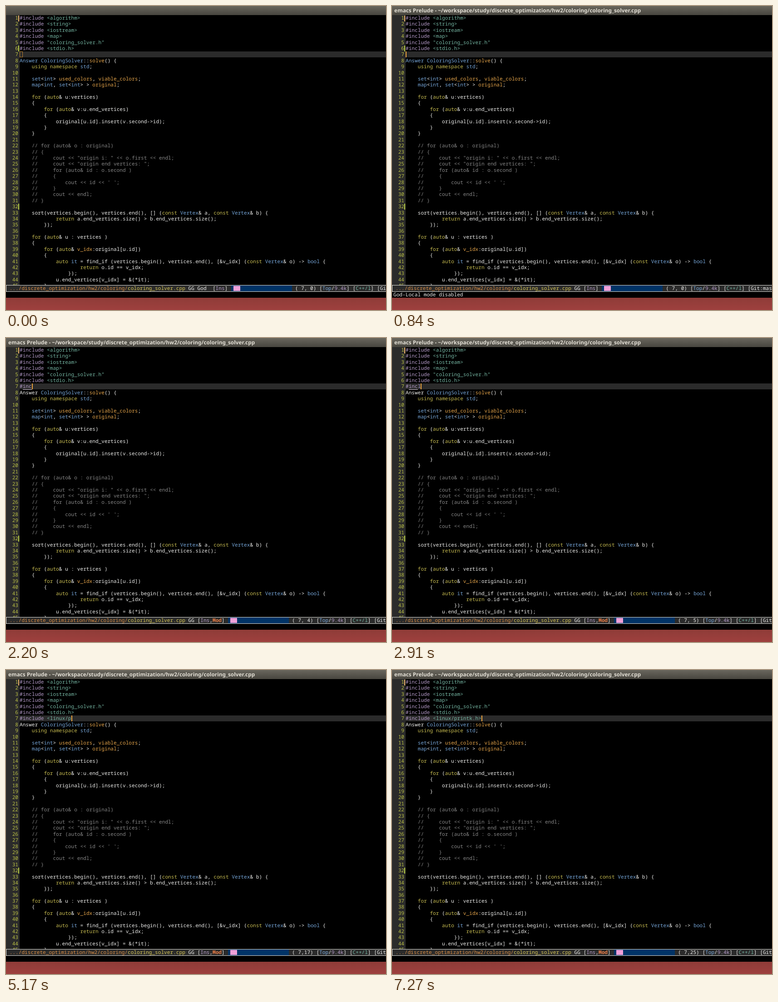
Animation of 837 by 669 pixels, one loop 8 s. Source, as an HTML page:

```html
<!DOCTYPE html>
<html lang="en">
<head>
<meta charset="utf-8">
<title>Editor</title>
<style>
  html, body { margin: 0; width: 100%; height: 100%; overflow: hidden; background: #000; }
  #stage { position: relative; width: 837px; height: 669px; overflow: hidden; background: #000; }
  #stage div { position: absolute; }
  #stage, pre {
    font: 11.14px/13.384px "Noto Sans Mono", "DejaVu Sans Mono", monospace;
    text-rendering: geometricPrecision; font-variant-ligatures: none; color: #eeeeec;
  }
  pre { position: absolute; margin: 0; white-space: pre; }
  #titlebar { left: 0; top: 0; width: 837px; height: 20px; background: linear-gradient(#69665d, #48463f); }
  #title { left: 5px; top: 1px; font: bold 11.85px/18px "Noto Sans", "Open Sans", sans-serif;
    white-space: pre; color: #e2ded4; }
  #editor { left: 0; top: 20px; width: 837px; height: 594px; overflow: hidden; }
  #gutter { left: 0; top: 0; width: 30px; height: 594px; background: #2b2b2b; }
  #numbers { right: 3px; top: 0; text-align: right; color: #b9bf45; }
  #current { left: 30px; top: 80px; width: 807px; height: 13px; background: #2b2b2b; }
  #code { left: 30px; top: 0; }
  .mark { left: 27px; width: 2px; height: 13px; background: #b9d045; }
  #cursor { top: 80px; height: 13px; box-sizing: border-box; background: #e8a03c; }
  #squiggle { top: 93px; height: 1px; background: #d8c8dc; }
  #modeline { left: 0; top: 614px; width: 850px; height: 13px; background: #2b2b2b; border: 1px solid #deded8; }
  #modeline pre { top: 0; line-height: 13px; }
  #bar { top: 0; width: 134px; height: 13px; background: #003366; }
  #bar div { left: 5px; top: 1px; width: 15px; height: 11px; background: #f0a0d8; }
  #message { left: 3px; top: 629px; }
  #desktop { left: 0; top: 642px; width: 837px; height: 27px; background: linear-gradient(#8f3c38, #9e403e); }
  .comment { color: #858585; }
  .directive { color: #b49ac8; }
  .string { color: #74b5a2; }
  .keyword { color: #c6bb50; }
  .type { color: #75a5d8; }
  .name { color: #e6a54a; }
  .path { color: #d68a42; }
  .file { color: #d5c554; }
  .modified { color: #e87b45; font-weight: bold; }
</style>
</head>
<body>
<div id="stage">
  <div id="titlebar"><div id="title">emacs Prelude - ~/workspace/study/discrete_optimization/hw2/coloring/coloring_solver.cpp</div></div>
  <div id="editor">
    <div id="gutter"><pre id="numbers"></pre></div>
    <div id="current"></div>
    <div class="mark" style="top:1px;background:#f0b56c"></div>
    <div class="mark" id="mark6" style="top:67px"></div>
    <div class="mark" style="top:415px"></div>
    <pre id="code"></pre>
    <div id="squiggle"></div>
    <div id="cursor"></div>
  </div>
  <div id="modeline"><pre id="modeLeft"></pre><div id="bar"><div></div></div><pre id="modeRight"></pre></div>
  <pre id="message">God-Local mode disabled</pre>
  <div id="desktop"></div>
</div>
<script>
const LOOP = 8000, CELL = 6.685;
const $ = id => document.getElementById(id);

// Shorthand in the listing: % opens a comment, @ is the name of the map.
const listing = `#include <algorithm>
#include <string>
#include <iostream>
#include <map>
#include "coloring_solver.h"
#include <stdio.h>

Answer ColoringSolver::solve() {
    using namespace std;

    set<int> used_colors, viable_colors;
    map<int, set<int> > @;

    for (auto& u:vertices)
    {
        for (auto& v:u.end_vertices)
        {
            @[u.id].insert(v.second->id);
        }
    }

    % for (auto& o : @)
    % {
    %     cout << "origin i: " << o.first << endl;
    %     cout << "origin end vertices: ";
    %     for (auto& id : o.second )
    %     {
    %         cout << id << ' ';
    %     }
    %     cout << endl;
    % }

    sort(vertices.begin(), vertices.end(), [] (const Vertex& a, const Vertex& b) {
            return a.end_vertices.size() > b.end_vertices.size();
        });

    for (auto& u : vertices )
    {
        for (auto& v_idx:@[u.id])
        {
            auto it = find_if (vertices.begin(), vertices.end(), [&v_idx] (const Vertex& o) -> bool {
                    return o.id == v_idx;
                });
            u.end_vertices[v_idx] = &(*it);
        }`.replaceAll("%", "/".repeat(2)).replaceAll("@", "original").split("\n");

const rules = new RegExp([
  /(?<comment>[/]{2}.*)/,
  /(?<directive>^#\w+)/,
  /(?<string>(?<=^#\w+ )[<"].*)/,
  /(?<keyword>\b(?:using|namespace|for|auto|const|return)\b)/,
  /(?<type>\b(?:Answer|ColoringSolver|std|set|map|int|Vertex|bool|it(?= =))\b)/,
  /(?<name>\b(?:solve|used_colors|viable_colors|v_idx(?=:)|(?<=> > )\w+)\b)/
].map(rule => String(rule).slice(1, -1)).join("|"), "g");

const escape = s => s.replace(/&/g, "&amp;").replace(/</g, "&lt;");
const span = (kind, s) => `<span class="${kind}">${escape(s)}</span>`;

function highlight(line) {
  let html = "", end = 0;
  for (const match of line.matchAll(rules)) {
    const kind = Object.keys(match.groups).find(k => match.groups[k] !== undefined);
    html += escape(line.slice(end, match.index)) + span(kind, match[0]);
    end = match.index + match[0].length;
  }
  return html + escape(line.slice(end));
}

const lines = listing.map(highlight);
$("numbers").textContent = lines.map((_, i) => i + 1).join("\n");
$("code").innerHTML = lines.map(html => `<span>${html}\n</span>`).join("");
const [typedLine, answerLine] = [6, 7].map(i => $("code").children[i]);

// Keystrokes: the text on the edited line from each time on.
const typing = [
  [0, ""], [1430, "#"], [1670, "#i"], [1730, "#in"], [1970, "#inc"], [2350, "#incu"],
  [2680, "#inc"], [2910, "#incl"], [2970, "#inclu"], [3030, "#includ"], [3170, "#include"],
  [3290, "#include "], [3410, "#include <"], [3590, "#include <p"], [3740, "#include <pri"],
  [3990, "#include <pr"], [4100, "#include <p"], [4230, "#include <"], [4510, "#include <l"],
  [4570, "#include <lin"], [4760, "#include <linu"], [4940, "#include <linux"],
  [5000, "#include <linux/"], [5170, "#include <linux/p"], [5370, "#include <linux/pr"],
  [5490, "#include <linux/pri"], [5850, "#include <linux/prin"], [6190, "#include <linux/print"],
  [6430, "#include <linux/printk"], [6510, "#include <linux/printk."],
  [6680, "#include <linux/printk.h"], [6940, "#include <linux/printk.h>"]
];

const show = (id, visible) => { $(id).style.visibility = visible ? "visible" : "hidden"; };
const place = (id, x, width) => Object.assign($(id).style, { left: x + "px", width: width + "px" });

function drawCursor(t, column) {
  const block = t < 770, hollow = t < 440;
  place("cursor", 30 + column * CELL, block ? 7 : 2);
  $("cursor").style.border = hollow ? "1px solid #b87f32" : "none";
  $("cursor").style.background = hollow ? "none" : "#e8a03c";
}

function drawModeLine(t, column) {
  const god = t < 770, modified = t >= 1480;
  const status = god ? " GG God  [" : " GG [";
  $("modeLeft").innerHTML = " " + span("path", ".../discrete_optimization/hw2/coloring/") +
    span("file", "coloring_solver.cpp") + status + span("directive", "Ins") +
    (modified ? "," + span("modified", "Mod") : "") + "]";
  const barX = CELL * (god ? 74 : modified ? 73 : 69);
  $("bar").style.left = barX + "px";
  $("modeRight").style.left = barX + 141 + "px";
  $("modeRight").innerHTML = `( 7,${String(column).padStart(2)}) [${span("type", "Top")}/` +
    `${span("directive", "9.4k")}] [${span("string", "C++/l")}] [Git:master]`;
}

function drawUnderline(t) {
  const word = t >= 2200 && t < 2970, suffix = t >= 7060 && t < 7270;
  show("squiggle", word || suffix);
  place("squiggle", 30 + CELL * (word ? 1 : 23), CELL * (word ? 3 : 1));
}

function render(t) {
  const text = typing.findLast(([start]) => start <= t)[1];
  // A lone "#" is not yet a directive.
  typedLine.innerHTML = highlight(text) + "\n";
  answerLine.firstElementChild.style.color = text ? "#eeeeec" : "";
  show("title", t >= 380);
  show("message", t >= 770 && t < 1430);
  show("mark6", !text);
  drawCursor(t, text.length);
  drawModeLine(t, text.length);
  drawUnderline(t);
}

function tick() {
  render(performance.now() % LOOP);
  requestAnimationFrame(tick);
}
tick();
</script>
</body>
</html>
```
